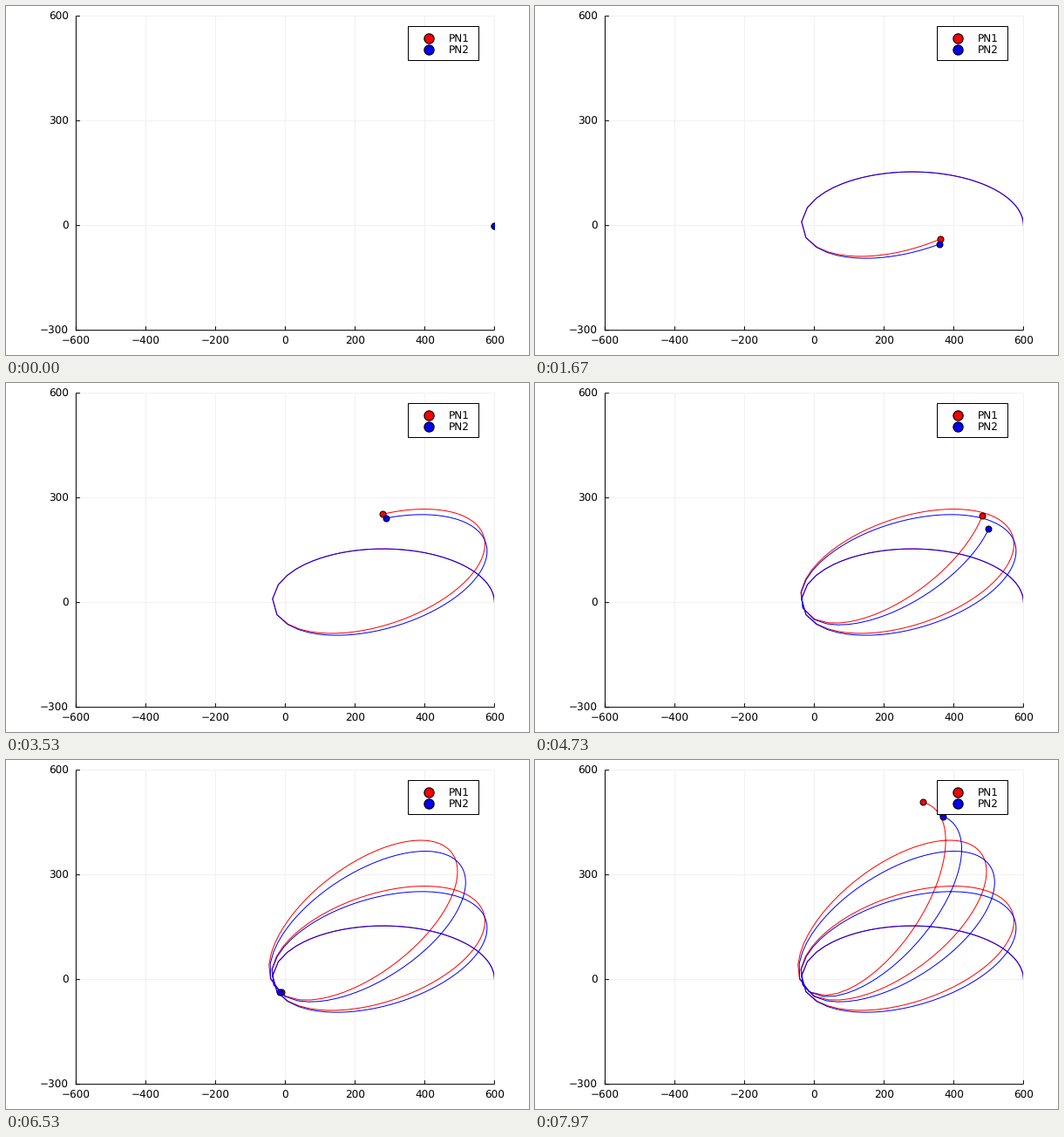
Animation, 600 px wide and 400 px high, one loop 8 s. Source, as a matplotlib script:

```python
import numpy as np
import matplotlib.pyplot as plt
from matplotlib.animation import FuncAnimation
from matplotlib.patches import Rectangle

W, H, DPI = 600, 400, 100
PX = 72 / DPI                      # one pixel in points
LEFT, TOP, SCALE = 80.4, 11.65, 0.4
RIGHT, BOTTOM = LEFT + 1200 * SCALE, TOP + 900 * SCALE

TICKS, TICK_MS = 800, 10           # the picture changes 30 times a second
FRAMES, STEPS = 240, 2             # orbit samples per picture

# Precessing orbit, measured from the far apsis
A, E_R, E_T, E_PHI = 318.25, 0.8853, 0.8735, 0.8870
RATE = 0.08021 / STEPS
ADVANCE, SECOND_ORDER = 1.0518, 0.0063

plt.rcParams["font.family"] = "DejaVu Sans"
plt.rcParams["font.size"] = 12 * PX
plt.rcParams["text.hinting"] = "none"


def px(x):
    return LEFT + (x + 600) * SCALE


def py(y):
    return BOTTOM - (y + 300) * SCALE


def orbits():
    mean = RATE * np.arange(STEPS * FRAMES)
    grid = np.linspace(0, 21, 40000)
    ecc = np.interp(mean, grid + E_T * np.sin(grid), grid)
    r = A * (1 + E_R * np.cos(ecc))
    stretch = np.sqrt((1 + E_PHI) / (1 - E_PHI))
    true = np.unwrap(2 * np.arctan2(np.sin(ecc / 2), stretch * np.cos(ecc / 2)))
    phi1 = ADVANCE * true
    phi2 = phi1 - SECOND_ORDER * (true - np.sin(true))
    return [(px(r * np.cos(p)), py(r * np.sin(p))) for p in (phi1, phi2)]


fig = plt.figure(figsize=(W / DPI, H / DPI), dpi=DPI, facecolor="white")
ax = fig.add_axes([0, 0, 1, 1])    # pixel coordinates, y downwards
ax.axis("off")


def label(x, y, text, ha):
    ax.text(x, y, text, ha=ha, va="baseline", zorder=12)


def number(v):
    return str(v).replace("-", "\u2212")


def dot(x, y, color, size, edge, z):
    return ax.plot(x, y, "o", ms=size * PX, mfc=color, mec="black",
                   mew=edge * PX, zorder=z, snap=False)[0]


xticks, yticks = np.arange(-600, 601, 200), np.arange(-300, 601, 300)
gx, gy = px(xticks), py(yticks)
pale = dict(colors="#f0f0f0", lw=PX, zorder=1, snap=False)
dark = dict(colors="black", lw=PX, zorder=2, snap=False)
ax.vlines(gx, TOP, BOTTOM, **pale)
ax.hlines(gy, LEFT, RIGHT, **pale)
ax.vlines(gx, BOTTOM - 4.5, BOTTOM, **dark)
ax.hlines(gy, LEFT, LEFT + 4.5, **dark)
ax.vlines(LEFT, TOP, BOTTOM + 0.5, **dark)
ax.hlines(BOTTOM, LEFT - 0.5, RIGHT, **dark)
for v, x in zip(xticks, gx):
    label(x, 387.4, number(v), "center")
for v, y in zip(yticks, gy):
    label(72, y + 4.3, number(v), "right")

colors = ("red", "blue")
tracks = orbits()
lines = [ax.plot([], [], color=c, lw=PX, zorder=3)[0] for c in colors]
dots = [dot([], [], c, 7, 1, 4) for c in colors]
window = Rectangle((LEFT, TOP), RIGHT - LEFT, BOTTOM - TOP, transform=ax.transData)
for artist in lines + dots:
    artist.set_clip_path(window)

# Legend above the curves
ax.add_patch(Rectangle((461.5, 23.5), 81, 39, fc="white", ec="black", lw=PX,
                       zorder=10, snap=False))
for name, c, y in zip(("PN1", "PN2"), colors, (36.9, 49.6)):
    dot(485, y, c, 11.2, 1.2, 11)
    label(507.5, y + 4.4, name, "left")

ax.set_xlim(0, W)
ax.set_ylim(H, 0)


def update(tick):
    last = STEPS * ((3 * tick + 1) // 10)
    for (x, y), line, mark in zip(tracks, lines, dots):
        line.set_data(x[:last + 1], y[:last + 1])
        mark.set_data([x[last]], [y[last]])
    return lines + dots


anim = FuncAnimation(fig, update, frames=TICKS, interval=TICK_MS,
                     repeat=True, repeat_delay=0, blit=False)
plt.show()
```
